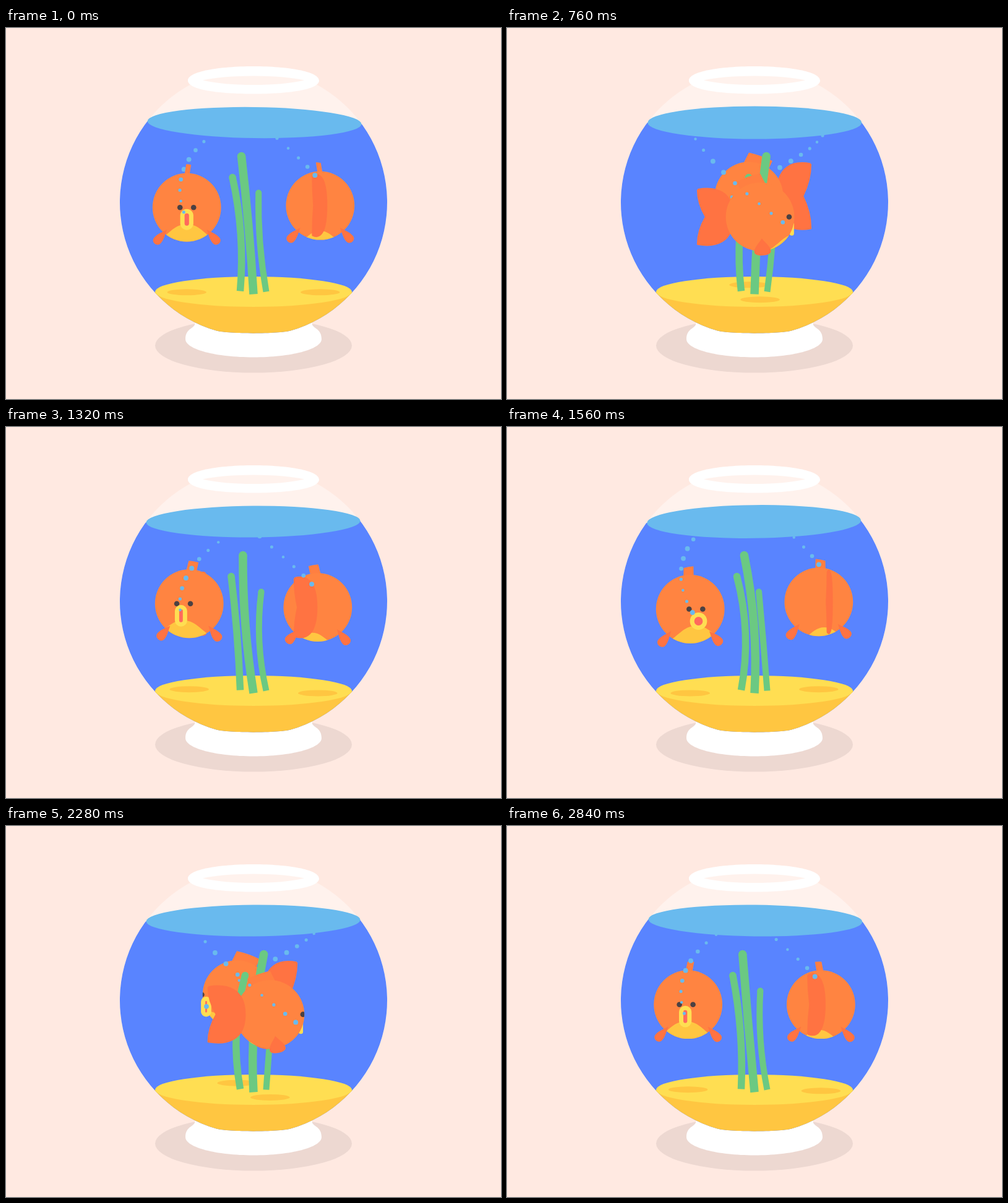
Animation, 800 px wide and 600 px high, one loop 2.88 s. Source, as an HTML page with a canvas:

```html
<!DOCTYPE html>
<html lang="en">
<head>
<meta charset="utf-8">
<title>Fishbowl</title>
<style>
  html, body { margin: 0; width: 100%; height: 100%; overflow: hidden; background: #ffe9e1; }
  canvas { display: block; }
</style>
</head>
<body>
<canvas id="stage" width="800" height="600"></canvas>
<script>
const ctx = document.getElementById('stage').getContext('2d');
const LOOP = 2880, HALF = 1440, FRAME = 40;
const TURN_RATE = 360 / LOOP;
const RADIUS = 55.4;
const BUBBLES = 27;
const COLOR = {
  back: '#ffe9e1', glass: '#fff2ed', shadow: '#edd8d1', water: '#5984ff', surface: '#69baee',
  sand: '#ffc641', sandTop: '#ffde52', plant: '#6bc982', body: '#ff8441', dorsal: '#ff7f41',
  fin: '#ff7342', belly: '#ffc641', lips: '#ffde52', mouth: '#ff6a5c', eye: '#4b4143'
};

const bowl = new Path2D('M340 489.5A216 216 0 1 1 460 489.5C440 495 360 495 340 489.5Z');
const foot = new Path2D('M305 476C308 486 290 484 290 503C290 520 340 532.5 400 532.5S510 520 510 503C510 484 492 486 495 476Z');
const rim = new Path2D('M294 85C294 70 345 62 400 62S506 70 506 85S455 106.5 400 106.5S294 100 294 85Z' +
  'M318 84.5Q350 92 400 92T482 84.5Q450 77.5 400 77.5T318 84.5Z');

const rad = deg => deg * Math.PI / 180;
const sin = deg => Math.sin(rad(deg));
const cos = deg => Math.cos(rad(deg));
const wrap = deg => ((deg % 360) + 360) % 360;
const wave = (t, peak, period) => Math.cos(2 * Math.PI * (t - peak) / period);

// Headings: 0 faces the viewer at the left, 90 swims right in front, 180 faces away.
const orbit = heading => heading + 1.2 * sin(2 * heading);
const swimX = heading => 400 - 107.8 * cos(orbit(heading));
const swimY = heading => 288.7 + 17 * sin(heading + 5);

function fill(color, path) {
  ctx.fillStyle = color;
  path ? ctx.fill(path) : ctx.fill();
}

function ellipse(color, x, y, rx, ry = rx, tilt = 0) {
  ctx.beginPath();
  ctx.ellipse(x, y, rx, ry, tilt, 0, 7);
  fill(color);
}

function pill(color, x, y, w, h) {
  ctx.beginPath();
  ctx.roundRect(x - w / 2, y - h / 2, w, h, Math.min(w, h) / 2);
  fill(color);
}

function drawTail(heading) {
  const away = Math.max(0, -cos(heading));
  const tip = -100 * sin(heading) - 12 * away;
  const notch = -87 * sin(heading) - 10 * away;
  const inner = -45 * sin(heading) + 10 * away;
  const mid = (tip + inner) / 2;
  const h = 48 - 4 * sin(heading);
  ctx.beginPath();
  ctx.moveTo(tip, -h);
  ctx.bezierCurveTo(mid, -h - 5, inner, -h + 2, inner, 0);
  ctx.bezierCurveTo(inner, h - 2, mid, h + 5, tip, h);
  ctx.quadraticCurveTo(tip, h / 2, notch, 0);
  ctx.quadraticCurveTo(tip, -h / 2, tip, -h);
  fill(COLOR.fin);
  ctx.strokeStyle = COLOR.fin;
  ctx.lineWidth = 3;
  ctx.lineJoin = 'round';
  ctx.stroke();
}

function drawFin(heading, side) {
  const angle = heading * side;
  const x = -34 * cos(angle), y = 38;
  const dx = -18 * cos(angle), dy = 20.5 + 4 * sin(angle);
  const length = Math.hypot(dx, dy);
  const w = 7 + 6.5 * sin(angle) ** 2;
  ctx.save();
  ctx.scale(side, 1);
  ctx.translate(x, y);
  ctx.rotate(Math.atan2(-dx, dy));
  ctx.beginPath();
  ctx.moveTo(0, -3);
  ctx.bezierCurveTo(w * .5, length * .25, w, length * .45, w, length * .75);
  ctx.bezierCurveTo(w, length * 1.08, -w, length * 1.08, -w, length * .75);
  ctx.bezierCurveTo(-w, length * .45, -w * .5, length * .25, 0, -3);
  fill(COLOR.fin);
  ctx.restore();
}

function drawDorsal(heading) {
  const m = Math.abs(sin(heading));
  const side = sin(heading) < 0 ? -1 : 1;
  const lean = 3 * cos(heading) * (1 - m) * side;
  ctx.save();
  ctx.scale(side, 1);
  ctx.beginPath();
  ctx.moveTo(4 + 6 * m, -51);
  ctx.lineTo(4 * (1 - m) + lean, -69 - 1.5 * m);
  ctx.quadraticCurveTo(-20 * m + lean, -70 + 4 * m, -4 - 34 * m + lean, -70 + 13 * m);
  ctx.lineTo(-4 - 27 * m, -51 + 9 * m);
  ctx.closePath();
  fill(COLOR.dorsal);
  ctx.restore();
}

// The mouth gapes five times per lap and narrows in profile.
function drawMouth(heading) {
  const open = (.5 + .5 * cos(5 * (heading - 21))) ** 2;
  const front = Math.max(0, cos(heading)) ** .25;
  const w = 7 + (13 + 9 * open) * front;
  const h = (35 - 8 * open) * (.8 + .2 * front);
  const x = 51.5 * sin(heading), y = 19.5;
  pill(COLOR.lips, x, y, w, h);
  if (w > 14) pill(COLOR.mouth, x, y, w - 14, h - 14);
}

function drawBelly(x, top, half, bottom) {
  ctx.beginPath();
  ctx.moveTo(x - half, bottom);
  ctx.bezierCurveTo(x - half * .58, bottom - 7, x - half * .43, top, x, top);
  ctx.bezierCurveTo(x + half * .43, top, x + half * .58, bottom - 7, x + half, bottom);
  fill(COLOR.belly);
}

function drawFish(heading) {
  const turn = heading > 180 ? heading - 360 : heading;
  const facing = cos(heading) >= 0;
  const tailBehind = cos(heading) > -.2;
  const nearSide = sin(heading) >= 0 ? 1 : -1;
  const endOn = Math.abs(sin(heading)) < .3;

  ctx.save();
  ctx.translate(swimX(heading), swimY(heading));
  if (tailBehind) drawTail(heading);
  if (!endOn) drawFin(heading, -nearSide);
  if (!facing) drawMouth(heading);
  drawDorsal(heading);
  ellipse(COLOR.body, 0, 0, RADIUS);

  ctx.save();
  ctx.beginPath();
  ctx.arc(0, 0, RADIUS, 0, 7);
  ctx.clip();
  drawBelly(.64 * turn, 27, 55, 57);
  drawBelly(.6 * (heading - 180), 41, 36, 60);
  for (const dx of [-11, 11]) ellipse(COLOR.eye, .61 * turn + dx, 0, 4.3);
  ctx.restore();

  if (!tailBehind) drawTail(heading);
  if (endOn) drawFin(heading, -nearSide);
  drawFin(heading, nearSide);
  if (facing) drawMouth(heading);
  ctx.restore();
}

// Bubbles leave the mouth at even steps, rise steadily and circle more slowly than the fish.
function drawBubbles(t, from, to) {
  for (let i = 0; i < BUBBLES; i++) {
    const release = wrap(4.2 + i * 360 / BUBBLES + 120) - 120;
    if (release < from || release >= to) continue;
    const size = 3.1 + .9 * wave(i, .5, 7);
    for (const start of [0, 180]) {
      const age = wrap(t * TURN_RATE + start - release) / TURN_RATE;
      const y = swimY(release) + 20 - .132 * age;
      if (y > 165) ellipse(COLOR.surface, 400 - 119 * cos(release + 25.3 + .036 * age), y, size);
    }
  }
}

function drawPlant(topX, topY, baseX, baseY, width, bulge) {
  ctx.beginPath();
  ctx.moveTo(baseX, baseY);
  ctx.quadraticCurveTo((topX + baseX) / 2 + 2 * bulge, (topY + baseY) / 2, topX, topY);
  ctx.strokeStyle = COLOR.plant;
  ctx.lineWidth = width;
  ctx.stroke();
  ellipse(COLOR.plant, topX, topY, width / 2);
}

function drawPlants(t) {
  const sway = peak => wave(t, peak, HALF);
  drawPlant(379 + 15 * sway(600), 241.5, 378.5, 425.5, 11.5, 11 * sway(200));
  drawPlant(400 + 19.5 * sway(715), 207.5, 400, 430.5, 13.5, 12 * sway(330));
  drawPlant(420 + 13 * sway(820), 266.5, 420.5, 426.5, 10, 8.5 * sway(470));
}

function draw(t) {
  const swing = wave(t, 40, LOOP / 3);
  const tilt = rad(.8 * swing);
  const surfaceX = 400.3 + 1.3 * swing;
  const heading = t * TURN_RATE % 180;

  ctx.fillStyle = COLOR.back;
  ctx.fillRect(0, 0, 800, 600);
  ellipse(COLOR.shadow, 400, 513.5, 159, 44);
  fill('#fff', foot);
  fill(COLOR.glass, bowl);

  ctx.save();
  ctx.clip(bowl);
  ctx.save();
  ctx.translate(surfaceX, 153);
  ctx.rotate(tilt);
  ctx.fillStyle = COLOR.water;
  ctx.fillRect(-300, 0, 600, 400);
  ctx.restore();
  ctx.fillStyle = COLOR.sand;
  ctx.fillRect(180, 427, 440, 80);
  ctx.restore();
  ellipse(COLOR.sandTop, 400, 426.5, 159, 24.5);
  ctx.fillStyle = '#fff';
  ctx.fill(rim, 'evenodd');

  for (const h of [heading, heading + 180]) {
    ellipse(COLOR.sand, swimX(h), 427.3 + 12 * sin(h), 31.8, 5);
  }
  drawBubbles(t, 100, 240);
  drawFish(heading + 180);
  drawBubbles(t, -120, -50);
  drawPlants(t);
  drawFish(heading);
  drawBubbles(t, -50, 100);
  ellipse(COLOR.surface, surfaceX, 153, 173, 25.7 - 1.2 * wave(t, 160, LOOP / 3), tilt);
}

function tick() {
  draw(Math.floor(performance.now() % LOOP / FRAME) * FRAME);
  requestAnimationFrame(tick);
}
tick();
</script>
</body>
</html>
```
